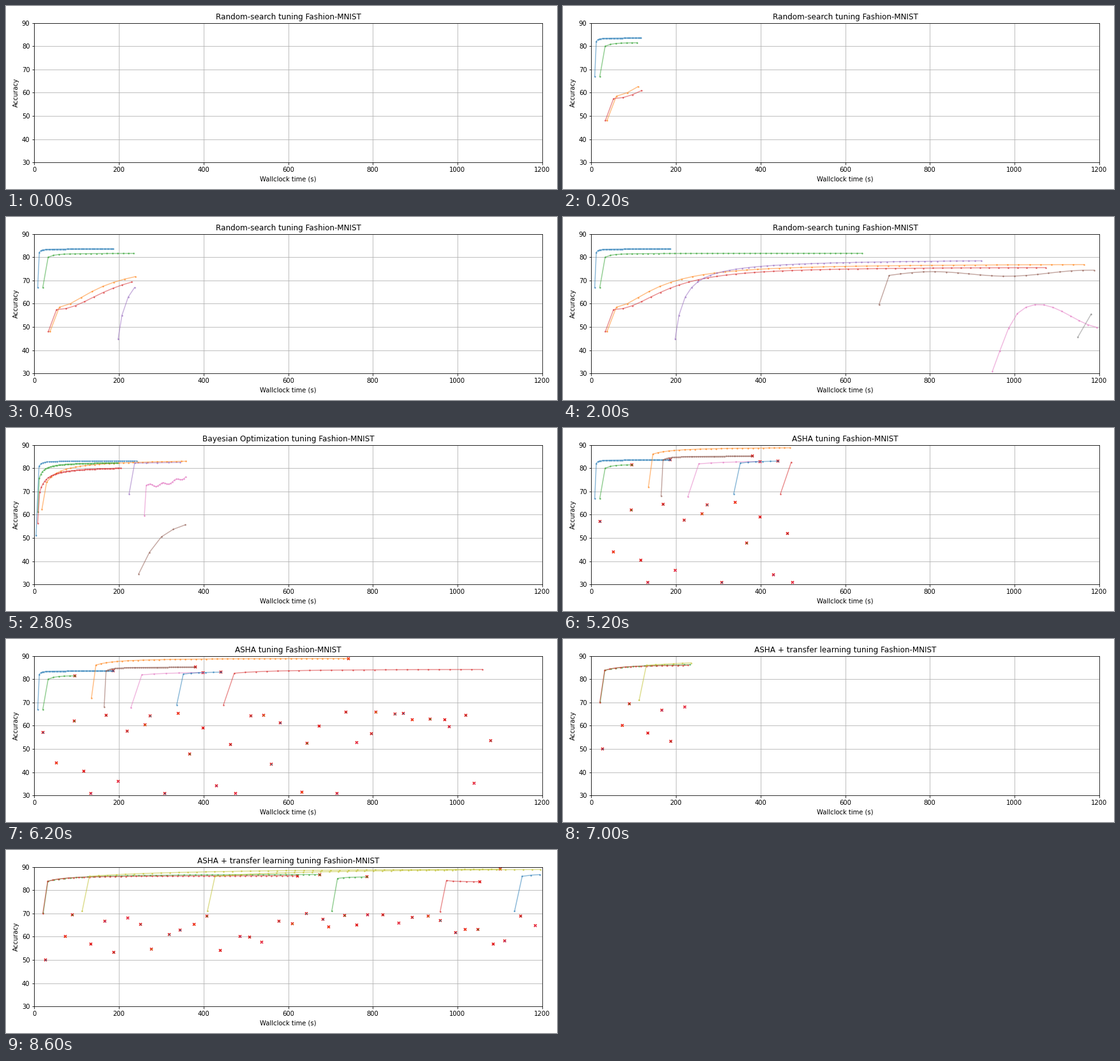
A matplotlib script for the animation above (8.8 s loop, 864x288 px).

```python
import numpy as np
import matplotlib.pyplot as plt
from matplotlib.animation import FuncAnimation

HORIZON, STEPS = 1200, 10
BLUE, ORANGE, GREEN, RED, PURPLE, BROWN, PINK, GRAY, OLIVE = (
    f"C{i}" for i in range(9))


def trial(color, first, second, top, step, epochs=50, half=1, sharp=1,
          wobble=0, period=1):
    """Learning curve that jumps from first to second, then saturates at top.

    Half the remaining gap is closed after `half` epochs; `sharp` bends the
    rise into an S, and `wobble` adds a sine of `period` epochs.
    """
    m = np.arange(epochs - 1)
    gap = (top - second[1]) / (1 + (m / half) ** sharp)
    scores = top - gap + wobble * np.sin(2 * np.pi * m / period)
    return color, np.r_[first[0], second[0] + step * m], np.r_[first[1], scores]


def early_stops(seed, count, ceiling, spread):
    """Trials stopped after one epoch: steady in time, skewed in accuracy."""
    rng = np.random.default_rng(seed)
    times = np.linspace(30, 1185, count) + rng.uniform(-12, 12, count)
    scores = ceiling - rng.exponential(spread, count)
    return np.c_[times, np.clip(scores, 31, None)]


def fast_blue():
    return trial(BLUE, (8, 67), (11.7, 82.1), 83.6, 3.65)


def steady_green(epochs):
    return trial(GREEN, (20, 67), (32.6, 80), 81.7, 12.65, epochs, sharp=1.2)


random_search = [
    fast_blue(),
    trial(ORANGE, (37, 48), (59, 58.5), 77.2, 25.7, 45, half=4.2, sharp=1.7),
    steady_green(50),
    trial(RED, (33, 48), (52.5, 57.5), 75.8, 22.2, 48, half=6, sharp=2.1),
    trial(PURPLE, (198, 44.7), (207, 55), 79.5, 14.9, half=2.1),
    trial(BROWN, (680, 59.6), (704, 72.2), 74, 26.9, half=12, wobble=1.2,
          period=14),
    trial(PINK, (948, 31), (965, 39.5), 55, 20.9, sharp=2, wobble=5.5, period=16),
    trial(GRAY, (1150, 45.7), (1181.5, 55.6), 60, 31.5),
]

bayesian = [
    trial(BLUE, (4, 51), (11, 80.8), 83.2, 4.8),
    trial(ORANGE, (18, 62.4), (29, 74), 84, 11.35, half=3.2),
    trial(GREEN, (8.5, 61.3), (11.5, 75.6), 82.7, 3.87, half=2.8),
    trial(RED, (8, 56.4), (12.5, 69.6), 80.9, 4, half=4),
    trial(PURPLE, (224, 69), (237, 82.2), 83.1, 27, half=8),
    trial(BROWN, (246.5, 34.5), (272, 43.8), 64.3, 28.2, half=2, wobble=-1,
          period=40),
    trial(PINK, (260, 59.5), (264.5, 72.6), 87, 4.45, half=32, sharp=2.5,
          wobble=0.6, period=7),
    trial(GRAY, (511.5, 48.8), (532.5, 58.6), 76, 23.7, half=4.7, sharp=2),
    trial(OLIVE, (606.5, 50.3), (626, 62.5), 82, 22, half=3, sharp=1.2),
]

asha = [
    fast_blue(),
    steady_green(7),
    trial(ORANGE, (135, 72), (145.5, 86.1), 89.2, 12.45, half=4),
    trial(BROWN, (165, 68.2), (169.5, 83.6), 85.3, 4.39, half=3),
    trial(PINK, (228, 67.7), (254, 81.9), 83.5, 29, 7, half=3),
    trial(BLUE, (336.5, 69), (352, 82.2), 83.4, 17.8, 7, half=2),
    trial(RED, (447, 69), (472.5, 82.6), 84.5, 25.5, half=4),
]

transfer = [
    trial(GREEN, (21, 70.2), (32, 83.9), 87.1, 13.4, half=5),
    trial(RED, (20, 70), (31.5, 83.8), 86.4, 12.3, half=3),
    trial(OLIVE, (113, 71), (130, 86), 90, 21.1, 48, half=14),
    trial(OLIVE, (409, 71), (427, 86), 90, 20.8, half=13),
    trial(GREEN, (703, 71), (716.5, 85.1), 86, 13.9, 7, half=2),
    trial(RED, (959, 70.7), (974, 84.2), 83.6, 15.9, 7),
    trial(BLUE, (1135, 71), (1153, 86), 87.5, 21, half=2),
]

NO_STOPS = np.empty((0, 2))
METHODS = [
    ("Random-search", random_search, NO_STOPS, False),
    ("Bayesian Optimization", bayesian, NO_STOPS, False),
    ("ASHA", asha, early_stops(3, 42, 67, 13), True),
    ("ASHA + transfer learning", transfer, early_stops(8, 37, 70, 7), True),
]

fig, ax = plt.subplots(figsize=(12, 4), dpi=72)
ax.set(xlim=(0, HORIZON), ylim=(30, 90), xlabel="Wallclock time (s)",
       ylabel="Accuracy", title="Random-search tuning Fashion-MNIST")
ax.grid(True)
fig.tight_layout()

CURVE = dict(marker=".", ms=3.4, lw=1.5, alpha=0.5)
CROSS = dict(marker="x", ls="", ms=4.8, mew=1.5, color="#e60000", zorder=1.9)


def update(frame):
    method, step = divmod(frame, STEPS + 1)
    now = step * HORIZON / STEPS
    name, trials, stops, mark_ends = METHODS[method]
    ax.set_title(f"{name} tuning Fashion-MNIST")
    for line in list(ax.lines):
        line.remove()

    crosses = list(stops[stops[:, 0] <= now])
    for i, (t, score) in enumerate(crosses):
        ax.plot([t], [score], color=f"C{i % 10}", **CURVE)
    for color, times, scores in trials:
        seen = times <= now
        ax.plot(times[seen], scores[seen], color=color, **CURVE)
        if mark_ends and seen.all():
            crosses.append((times[-1], scores[-1]))
    if crosses:
        ax.plot(*np.transpose(crosses), **CROSS)
    return ax.lines


anim = FuncAnimation(fig, update, frames=len(METHODS) * (STEPS + 1), interval=200,
                     init_func=lambda: [], repeat=True, repeat_delay=0)
plt.show()
```
